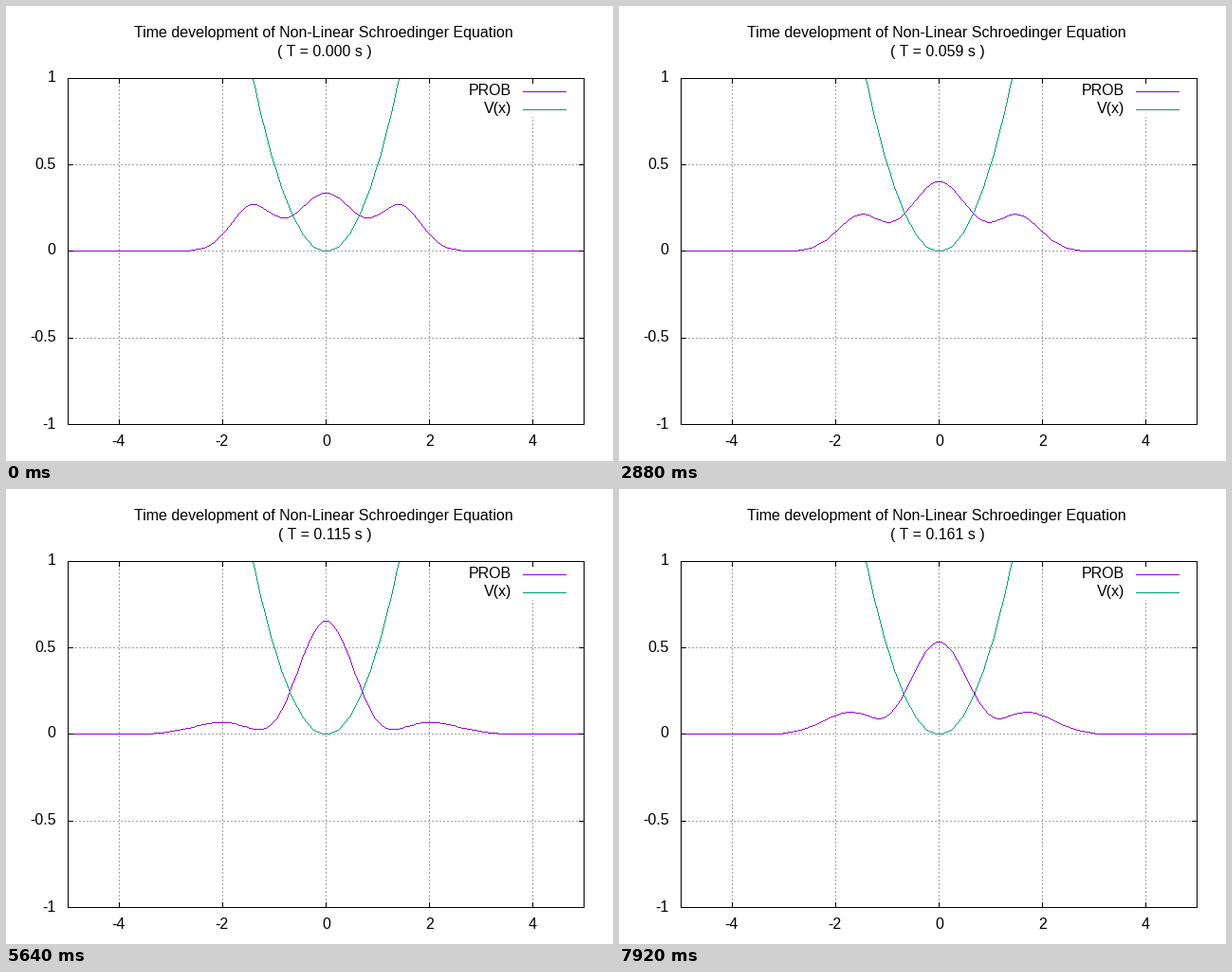
Recreate the animation shown at these times as a matplotlib script. Size 640 px wide and 480 px high, loop 8000 ms.

```python
import numpy as np
import matplotlib.pyplot as plt
from matplotlib.animation import FuncAnimation

plt.rcParams["font.family"] = "Liberation Sans"

W, H = 640, 480
LEFT, RIGHT, TOP, BOTTOM = 65, 609, 76, 441
BLACK, GREY = (0, 0, 0), (160, 160, 160)
PURPLE, GREEN = (148, 0, 211), (0, 158, 115)
TEXT = 11.52       # 16 px in points
HOLD = 3           # ticks of 40 ms per step
xs = np.linspace(-5, 5, 100)


def px(x):
    return np.floor(337.5 + 54.4 * x)


def py(y):
    return np.floor(258.9 - 182.5 * y)


def breathing(step):
    """Slowly beating oscillation between spread (-1) and focused (+1)."""
    theta = -2.32 + 0.966 * step + 0.2 * np.cos(step / 8.6)
    return np.cos(theta - 0.15 * np.sin(2 * theta))


def density(step):
    """A central peak that trades its mass with two moving side lobes."""
    u = breathing(step)
    r = np.abs(xs)
    core = (0.475 + 0.22 * u) * np.exp(-(1.82 + 0.1 * u) * r**2 - 0.4 * r**6)
    height = 0.165 - 0.146 * u + 0.034 * u**2
    middle = 1.6 + 0.39 * u + 0.13 * u**2
    outer = 0.49 + 0.22 * u
    inner = outer * (1 - 0.5 * max(u, 0) ** 3)
    spread = np.where(r < middle, inner, outer)
    return core + height * np.exp(-(r - middle) ** 2 / spread)


def stroke(img, x, y, color, dotted=False):
    """Polyline one pixel wide, without smoothing."""
    for x0, y0, x1, y1 in zip(x[:-1], y[:-1], x[1:], y[1:]):
        n = int(max(abs(x1 - x0), abs(y1 - y0), 1))
        i = np.arange(n + 1)
        col = np.floor(x0 + (x1 - x0) * i / n + 0.5).astype(int)
        row = np.floor(y0 + (y1 - y0) * i / n + 0.5).astype(int)
        keep = (row >= TOP) & (row <= BOTTOM)
        if dotted:
            keep &= i % 4 < 2
        img[row[keep], col[keep]] = color


fig = plt.figure(figsize=(W / 100, H / 100), dpi=100, facecolor="white")
ax = fig.add_axes([0, 0, 1, 1])
ax.axis("off")


def label(x, y, s, ha="center"):
    return ax.text(x, y, s, size=TEXT, ha=ha, va="baseline")


grid = np.full((H, W, 3), 255, np.uint8)
ticks = []

for v in (-4, -2, 0, 2, 4):
    x = px(v)
    # the last grid line stops below the legend
    stroke(grid, [x, x], [BOTTOM, 117 if v == 4 else TOP], GREY, dotted=True)
    ticks += [([x, x], [BOTTOM, BOTTOM - 5]), ([x, x], [TOP, TOP + 5])]
    label(x - (v < 0), 464, str(v))

for v in (-1, -0.5, 0, 0.5, 1):
    y = py(v)
    if abs(v) < 1:
        stroke(grid, [LEFT, RIGHT], [y, y], GREY, dotted=True)
    ticks += [([LEFT, LEFT + 5], [y, y]), ([RIGHT, RIGHT - 5], [y, y])]
    label(52, y + 4, f"{v:g}", "right")

for y, name, color in ((90, "PROB", PURPLE), (109, "V(x)", GREEN)):
    label(532.5, y + 4, name, "right")
    stroke(grid, [545, 590], [y, y], color)

label(334.3, 33, "Time development of Non-Linear Schroedinger Equation")
clock = label(335.7, 52, "")

border = ([LEFT, RIGHT, RIGHT, LEFT, LEFT], [TOP, TOP, BOTTOM, BOTTOM, TOP])


def picture(step):
    img = grid.copy()
    stroke(img, px(xs), py(density(step)), PURPLE)
    well = xs[np.abs(xs) < 1.6]
    stroke(img, px(well), py(well**2 / 2), GREEN)
    for x, y in ticks + [border]:
        stroke(img, x, y, BLACK)
    return img


plot = ax.imshow(picture(0), extent=(-0.5, W - 0.5, H - 0.5, -0.5),
                 aspect="auto", interpolation="nearest", zorder=0)


def update(tick):
    step = tick // HOLD
    if tick % HOLD == 0:
        plot.set_data(picture(step))
        clock.set_text(f"( T = {0.00244 * step:.3f} s )")
    return plot, clock


anim = FuncAnimation(fig, update, frames=200, interval=40, repeat=True,
                     repeat_delay=0, blit=False)
plt.show()
```
